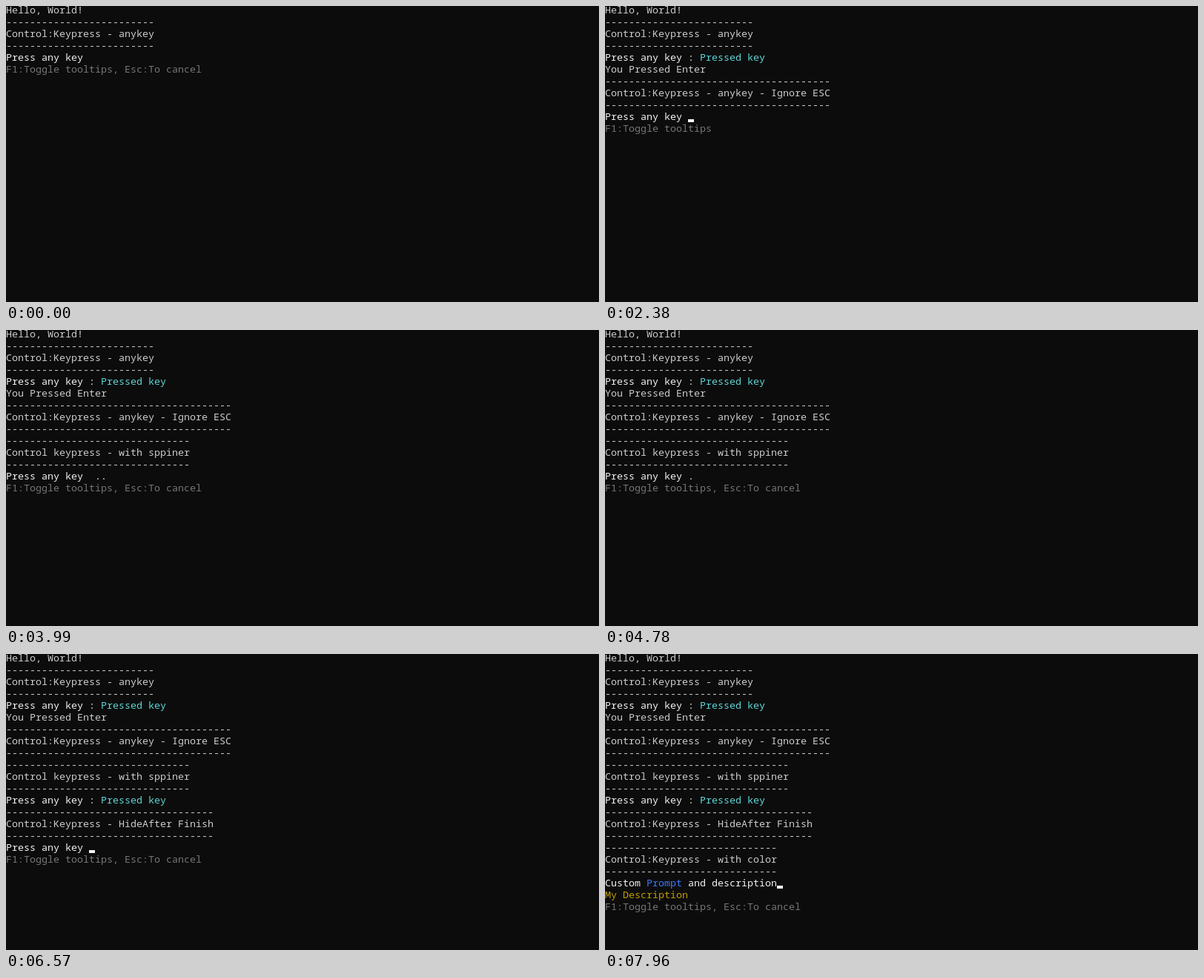
Animation of 800x400 px, one loop 8000 ms. Source, as an HTML page:

```html
<!DOCTYPE html>
<html lang="en">
<head>
<meta charset="utf-8">
<title>Keypress console</title>
<style>
html, body { margin: 0; width: 100%; height: 100%; overflow: hidden; background: #0c0c0c; }
#screen {
  position: absolute; left: 0; top: -3px; margin: 0;
  font: 13.3333px/16px "Noto Sans Mono", "Liberation Mono", monospace;
  font-variant-ligatures: none; white-space: pre; color: #ccc;
}
#screen div { height: 16px; }
.white { color: #f2f2f2; }
.tip { color: #767676; }
.cyan { color: #61d6d6; }
.blue { color: #3b78ff; }
.gold { color: #c19c00; }
#cursor { position: absolute; width: 8px; height: 4px; background: #f2f2f2; }
</style>
</head>
<body>
<div id="screen"></div>
<div id="cursor"></div>
<script>
const LOOP = 8000, CELL = 8, LINE = 16;
const screen = document.getElementById('screen');
const cursor = document.getElementById('cursor');

// A row is a list of [text, class] runs.
const row = (text, cls = '') => [[text, cls]];
const header = title => {
  const rule = row('-'.repeat(title.length));
  return [rule, row(title), rule];
};
const ask = 'Press any key ';
const prompt = row(ask, 'white');
const toggle = 'F1:Toggle tooltips';
const tip = row(toggle + ', Esc:To cancel', 'tip');
const answer = [[ask + ': ', 'white'], ['Pressed key', 'cyan']];

const intro = [row('Hello, World!'), ...header('Control:Keypress - anykey')];
const second = [...intro, answer, row('You Pressed Enter'),
  ...header('Control:Keypress - anykey - Ignore ESC')];
const third = [...second, ...header('Control keypress - with sppiner')];
const fourth = [...third, answer, ...header('Control:Keypress - HideAfter Finish')];
const fifth = [...fourth, ...header('Control:Keypress - with color')];
const custom = [['Custom ', 'white'], ['Prompt', 'blue'], [' and description', 'white']];

// Each scene: start time, rows, cursor cell, times at which the cursor toggles.
const scenes = [
  { at: 0, rows: [...intro, prompt, tip], cell: [14, 4], on: false, flips: [190, 790, 1190] },
  { at: 1380, rows: [...second, prompt, row(toggle, 'tip')], cell: [14, 9], on: true, flips: [1780, 2380, 2970] },
  { at: 3170, rows: [...third, prompt, tip], spin: 12 },
  { at: 5570, rows: [...fourth, prompt, tip], cell: [14, 16], on: true, flips: [5970, 6570] },
  { at: 7160, rows: [...fifth, custom, row('My Description', 'gold'), tip], cell: [29, 19], on: true, flips: [7560, 7960] }
];

const dots = ['   ', '.  ', '.. ', '...', ' ..', '  .'];
const ticks = [3170, 3370, 3570, 3790, 3990, 4380, 4580, 4780, 4980, 5180, 5380];

const passed = (times, t) => times.filter(x => x <= t).length;

function show(rows) {
  screen.replaceChildren(...rows.map(runs => {
    const line = document.createElement('div');
    for (const [text, cls] of runs) {
      const span = document.createElement('span');
      span.className = cls;
      span.textContent = text;
      line.append(span);
    }
    return line;
  }));
}

let current;
function draw(t) {
  const scene = scenes[passed(scenes.map(s => s.at), t) - 1];
  if (scene !== current) show((current = scene).rows);

  if (scene.spin) {
    const step = (passed(ticks, t) - 1) % dots.length;
    screen.children[scene.spin].firstChild.textContent = ask + dots[step];
  }

  const lit = scene.cell && scene.on !== (passed(scene.flips, t) % 2 === 1);
  cursor.hidden = !lit;
  if (lit) {
    cursor.style.left = scene.cell[0] * CELL + 'px';
    cursor.style.top = scene.cell[1] * LINE + 9 + 'px';
  }
}

const start = performance.now();
function frame() {
  draw((performance.now() - start) % LOOP);
  requestAnimationFrame(frame);
}
frame();
</script>
</body>
</html>
```
